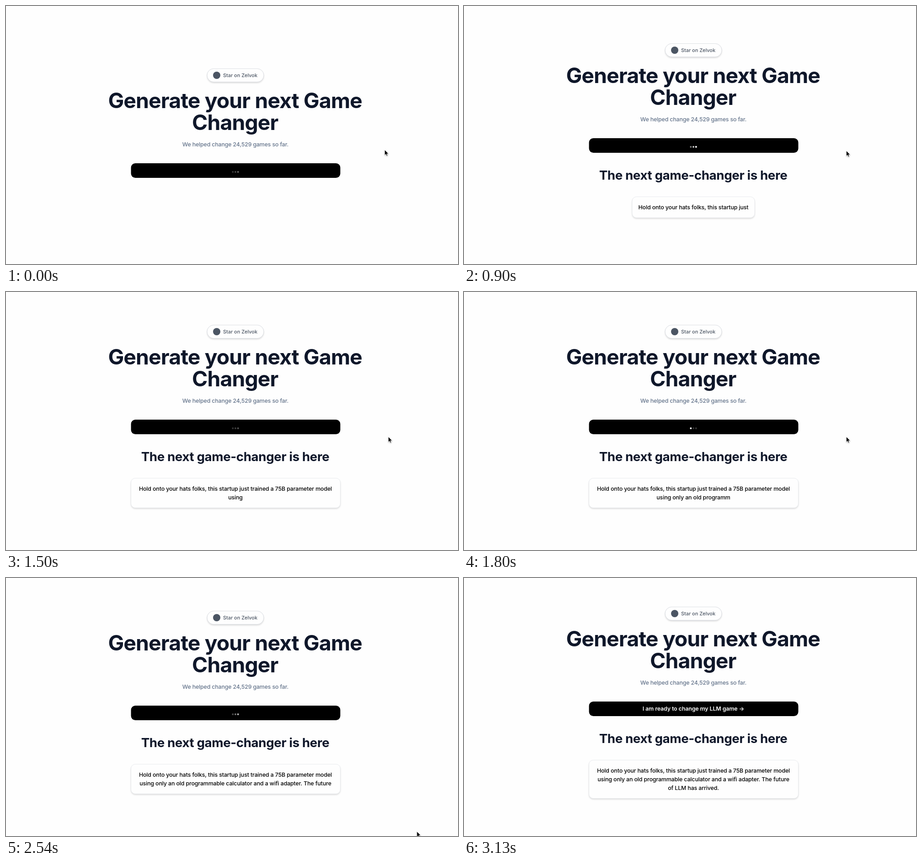
Animation, 989 px wide and 566 px high, one loop 5.82 s. Source, as an HTML page:

```html
<!DOCTYPE html>
<html lang="en">
<head>
<meta charset="utf-8">
<title>Game Changer generator</title>
<style>
  html, body { margin: 0; width: 100%; height: 100%; overflow: hidden; background: #fefefe; }
  svg { display: block; }
  text {
    font-family: Inter, "Liberation Sans", sans-serif;
    font-size: 12.34px;
    font-weight: 450;
    font-optical-sizing: none;
    text-anchor: middle;
  }
  .title { font-size: 46.3px; font-weight: 700; letter-spacing: -.0185em; fill: #0f172a; }
  .heading { font-size: 27.7px; font-weight: 700; letter-spacing: -.0135em; fill: #0f172a; }
  .count { letter-spacing: -.01em; fill: #64748b; }
  .badge { font-size: 10.9px; text-anchor: start; fill: #4b5563; }
  .action { font-weight: 600; letter-spacing: -.006em; fill: #fff; }
  .typed { letter-spacing: -.008em; fill: #000; }
  .raised { fill: #fefefe; filter: drop-shadow(0 2px 1.5px rgba(0, 0, 0, .13)); }
</style>
</head>
<body>
<svg width="989" height="566" viewBox="0 0 989 566">
  <g id="page">
    <rect class="raised" x="440" y=".4" width="124" height="29.4" rx="14.7" stroke="#d1d5db" stroke-width=".8"/>
    <circle cx="461" cy="15" r="8" fill="#4b5563"/>
    <text class="badge" x="475" y="19">Star on Zelvok</text>
    <text class="title" x="501.3" y="87.2">Generate your next Game</text>
    <text class="title" x="501.3" y="134.9">Changer</text>
    <text class="count" x="502" y="171.3">We helped change 24,529 games so far.</text>
    <rect x="273.5" y="208" width="458" height="32" rx="9.5"/>
    <g id="dots" fill="#fff">
      <circle cx="496.3" cy="227" r="2"/>
      <circle cx="502" cy="227" r="2"/>
      <circle cx="507.7" cy="227" r="2"/>
    </g>
    <text id="action" class="action" x="502" y="228.4">I am ready to change my LLM game →</text>
    <g id="result">
      <text class="heading" x="501.5" y="298.7">The next game-changer is here</text>
      <rect id="card" class="raised" y="336.5" rx="9.5" stroke="#e5e7eb" stroke-width=".8"/>
      <text class="typed" x="502" y="363.8"></text>
      <text class="typed" x="502" y="382.9"></text>
      <text class="typed" x="502" y="402"></text>
    </g>
  </g>
  <path id="cursor" d="M0 0V12L2.7 9.5L4.5 13.5L6.6 12.6L4.8 8.7H8.5Z" stroke="#fff" stroke-width=".9"
        style="filter: drop-shadow(0 1px 1px rgba(0, 0, 0, .3))"/>
</svg>
<script>
  const LOOP = 5820;
  const BLINK = 1400;
  const CENTER = 502.5;

  // One streamed chunk per screen update; a newline starts a new line.
  const chunks = ('||Hold onto| your hats| folks,| this startup| just| trained a| 75|B parameter|' +
    ' model\nusing| only an| old programm|able calculator| and a| wifi adapter|. The| future|' +
    '\nof L|LM has| arrived|.').split('|');
  const last = chunks.length - 1;

  // Pointer stops: step, x, y
  const stops = [
    [0, 828.5, 315.5], [2, 837.5, 317.5], [3, 836.5, 317.5], [14, 836.5, 345],
    [15, 859.5, 447], [16, 898, 556], [17, 899, 556], [18, 903, 554.5],
    [19, 909, 555], [20, 928, 557]
  ];

  const $ = id => document.getElementById(id);
  const page = $('page'), dots = $('dots'), action = $('action');
  const result = $('result'), card = $('card'), cursor = $('cursor');
  const lineNodes = [...document.querySelectorAll('.typed')];
  const show = (node, on) => node.setAttribute('visibility', on ? 'visible' : 'hidden');

  // Updates come every 150 ms, slightly faster after 2400 ms.
  const stepTime = n => n <= 16 ? n * 150 : 2400 + Math.floor((n - 16) * 14.7) * 10;

  // The CSS "ease" curve, cubic-bezier(.25, .1, .25, 1), solved by bisection.
  function ease(x) {
    let low = 0, high = 1, s = .5;
    for (let i = 0; i < 16; i++) {
      if (.75 * s * (1 - s) + s ** 3 < x) low = s; else high = s;
      s = (low + high) / 2;
    }
    return .3 * s * (1 - s) ** 2 + 3 * s * s * (1 - s) + s ** 3;
  }

  function blink(ms) {
    const p = ((ms % BLINK) + BLINK) % BLINK / BLINK;
    return p < .2 ? .2 + .8 * ease(p / .2) : 1 - .8 * ease((p - .2) / .8);
  }

  function drawCard(lines) {
    lineNodes.forEach((node, i) => { node.textContent = lines[i] || ''; });
    const full = lines.length > 1;
    const width = full ? 458 : lineNodes[0].getComputedTextLength() + 27;
    card.setAttribute('x', (full ? CENTER : 502) - width / 2);
    card.setAttribute('width', width);
    card.setAttribute('height', 27 + 19 * lines.length);
  }

  function draw(t) {
    let step = last;
    while (stepTime(step) > t) step--;
    const text = chunks.slice(0, step + 1).join('');
    const lines = text.split('\n');
    const done = step === last;

    const top = text ? Math.floor(91.5 - 9.5 * lines.length) : 137;
    page.setAttribute('transform', `translate(0 ${top})`);
    show(result, text);
    if (text) drawCard(lines);

    show(action, done);
    show(dots, !done);
    [...dots.children].forEach((dot, i) =>
      dot.setAttribute('opacity', blink(stepTime(step) - 1600 - 200 * i)));

    const [, x, y] = stops.filter(([from]) => from <= step).pop();
    cursor.setAttribute('transform', `translate(${x} ${y})`);
    show(cursor, !done);
  }

  function tick() {
    draw(performance.now() % LOOP);
    requestAnimationFrame(tick);
  }
  tick();
</script>
</body>
</html>
```
